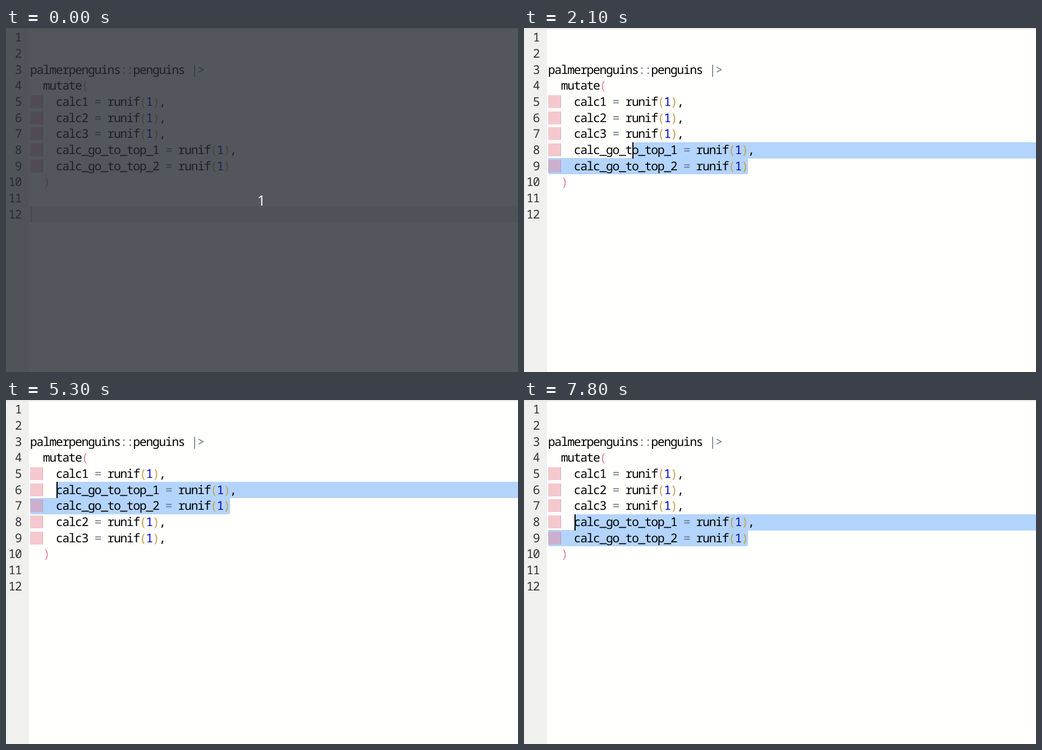
Animation, 912 px wide and 614 px high, one loop 8 s. Source, as an HTML page:

```html
<!DOCTYPE html>
<html lang="en">
<head>
<meta charset="utf-8">
<title>Moving lines in a code editor</title>
<style>
  html, body { margin: 0; width: 100%; height: 100%; overflow: hidden; background: #fffffe; }
  #stage { position: relative; width: 912px; height: 614px; overflow: hidden; background: #fffffe; }
  #stage div, #stage span { position: absolute; }
  #gutter { left: 0; top: 0; width: 41px; height: 614px; background: #f0f0ef; }
  #edge { left: 0; top: 0; width: 912px; height: 1px; background: #f5f5f4; border-bottom: 1px solid #d9d9d8; }
  .row, .num {
    --track: calc(11.47px - .6em);
    font-family: "Noto Sans Mono", "DejaVu Sans Mono", monospace;
    font-size: 21.5px; line-height: 28.7px; letter-spacing: var(--track);
    white-space: pre; text-rendering: geometricPrecision; color: #000;
  }
  .row { left: 0; height: 28.7px; }
  .row span, .num { margin-left: calc(var(--track) / 2); }
  .num { left: 0; width: 28px; text-align: right; color: #333; }
  .op { color: #687687; }
  .digit { color: #0000cd; }
  .outer { color: #e68593; }
  .inner { color: #c99e4f; }
  .indent {
    left: 43px; top: 2px; width: 23px; height: 23px; box-sizing: border-box;
    background: rgba(232, 130, 146, .44); border-right: 1px solid rgba(150, 110, 120, .3);
  }
  #active { left: 41px; width: 871px; background: #ebebea; }
  .match { background: #d5d5d3; }
  .sel { background: #b3d4fc; }
  #selTop { border-radius: 3px 0 0 0; }
  #selEnd { border-radius: 0 0 3px 3px; }
  #caret { width: 2px; background: #000; }
  #shade { inset: 0; background: rgba(37, 42, 50, .79); }
  #count {
    left: 0; width: 910px; top: 292px; line-height: 30px; text-align: center;
    font-family: "Open Sans", "Noto Sans", sans-serif; font-size: 26px; color: #fff;
  }
</style>
</head>
<body>
<div id="stage">
  <div id="gutter"></div>
  <div id="active"></div>
  <div id="matchL" class="match"></div>
  <div id="matchR" class="match"></div>
  <div id="selTop" class="sel"></div>
  <div id="selEnd" class="sel"></div>
  <div id="code"></div>
  <div id="caret"></div>
  <div id="edge"></div>
  <div id="shade"><div id="count">1</div></div>
</div>
<script>
const LOOP = 8000, LEFT = 43.5, CELL = 11.47, TOP = 3.4, PITCH = 28.67;
const END = 31;       // length of the last argument line
const FIRST = 5;      // row of the first argument

// time, caret row, caret column
const steps = [
  [0, 12, 0], [1400, 9, END],
  [1700, 8, 31], [1800, 8, 26], [1900, 8, 21], [2000, 8, 17], [2100, 8, 13], [2200, 8, 10],
  [2400, 8, 9], [2700, 8, 8], [2900, 8, 7], [3100, 8, 6], [3300, 8, 3], [3900, 8, 4],
  [4900, 7, 4], [5300, 6, 4], [5600, 5, 4], [5900, 6, 4], [6100, 7, 4], [6300, 8, 4],
  [6600, 7, 4], [6800, 6, 4], [7000, 5, 4], [7300, 6, 4], [7500, 7, 4], [7800, 8, 4]
];
const FOCUS_AT = 1400, SELECT_AT = 1700, SHADE_END = 100;

const $ = id => document.getElementById(id);
const colX = col => LEFT + col * CELL;
const rowY = row => TOP + (row - 1) * PITCH;

function add(parent, tag, className, text = "") {
  const el = document.createElement(tag);
  el.className = className;
  el.textContent = text;
  return parent.appendChild(el);
}

function place(el, row, from, to) {
  const x = from === 0 ? 43 : Math.round(colX(from));
  const right = to === undefined ? 912 : Math.round(colX(to));
  el.style.left = x + "px";
  el.style.width = right - x + "px";
  el.style.top = Math.floor(rowY(row)) + "px";
  el.style.height = Math.ceil(PITCH) + "px";
}

function kind(token, paren) {
  if (/^(::|\|>|=)$/.test(token)) return "op";
  if (/^\d+$/.test(token)) return "digit";
  return /^[()]$/.test(token) ? paren : "";
}

function addLine(text, paren) {
  const row = add($("code"), "div", "row");
  if (paren === "inner") add(row, "div", "indent");
  for (const m of text.matchAll(/\w+|::|\|>|[=(),]/g)) {
    add(row, "span", kind(m[0], paren), m[0]).style.left = colX(m.index) + "px";
  }
  return row;
}

const setRow = (el, row) => { el.style.top = Math.round(rowY(row)) + "px"; };

for (let n = 1; n <= 12; n++) setRow(add($("stage"), "div", "num", n), n);
$("stage").append($("shade"));

setRow(addLine("palmerpenguins::penguins |>", "outer"), 3);
setRow(addLine("  mutate(", "outer"), 4);
setRow(addLine("  )", "outer"), 10);
const plain = [1, 2, 3].map(n => addLine(`    calc${n} = runif(1),`, "inner"));
const moved = [
  addLine("    calc_go_to_top_1 = runif(1),", "inner"),
  addLine("    calc_go_to_top_2 = runif(1)", "inner")
];

function show([time, row, col]) {
  const selecting = time >= SELECT_AT;
  const order = [...plain];
  order.splice(selecting ? row - FIRST : 3, 0, ...moved);
  order.forEach((el, i) => setRow(el, FIRST + i));

  $("active").hidden = selecting;
  $("matchL").hidden = $("matchR").hidden = row !== 9;
  $("selTop").hidden = $("selEnd").hidden = !selecting;
  if (selecting) {
    place($("selTop"), row, col);
    place($("selEnd"), row + 1, 0, END);
  } else {
    place($("active"), row, 0);
    $("active").style.left = "41px";
    $("active").style.width = "871px";
    place($("matchL"), row, END - 3, END - 2);
    place($("matchR"), row, END - 1, END);
  }
  const caret = $("caret");
  place(caret, row, col);
  caret.style.left = Math.ceil(colX(col)) + "px";
  caret.style.width = "2px";
  caret.style.opacity = time < FOCUS_AT ? .2 : 1;
}

const start = performance.now();
let current;

function tick() {
  const time = (performance.now() - start) % LOOP;
  const step = steps.findLast(s => s[0] <= time);
  if (step !== current) show(current = step);
  $("shade").hidden = time >= SHADE_END;
  requestAnimationFrame(tick);
}
tick();
</script>
</body>
</html>
```
